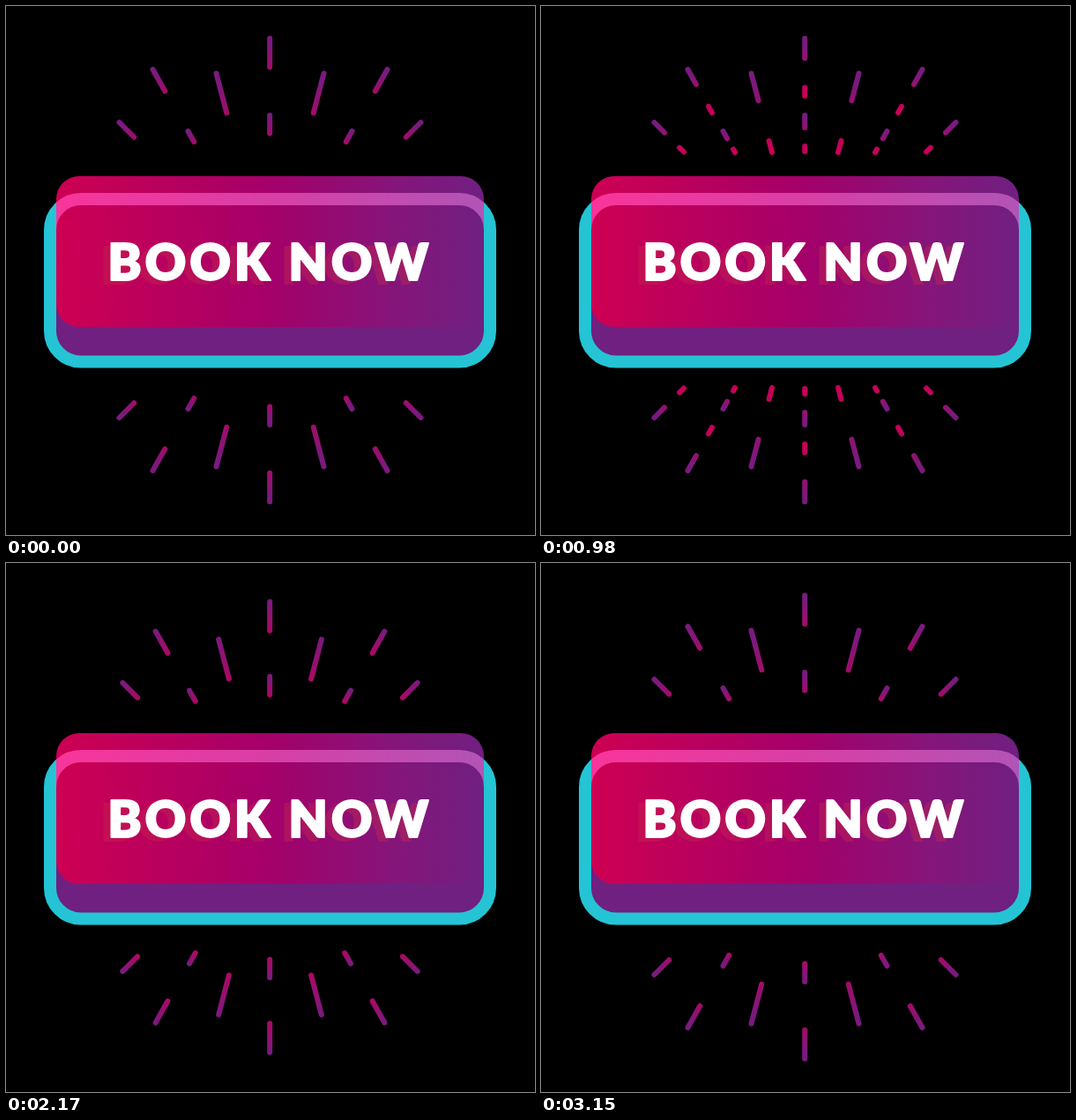
These frames come from a looping animation (600 px wide and 600 px high, 3220 ms). An HTML page:

```html
<!DOCTYPE html>
<html lang="en">
<head>
<meta charset="utf-8">
<title>Book now</title>
<style>
  html, body { margin: 0; width: 100%; height: 100%; overflow: hidden; background: #000; }
  svg { display: block; width: 100%; height: 100%; }
  text { font: 900 57px Lato, sans-serif; letter-spacing: 4.2px; stroke-width: 2; stroke-linejoin: round; }
  .ray { fill: none; stroke-width: 6; stroke-linecap: round; stroke-dasharray: 1 1.02; }
  #label { fill: #fff; stroke: #fff; }
  #shade { fill: #c42a4c; stroke: #c42a4c; }
</style>
</head>
<body>
<svg viewBox="0 0 600 600">
  <defs>
    <linearGradient id="face">
      <stop offset="0" stop-color="#cd0052"/>
      <stop offset=".5" stop-color="#a4006a"/>
      <stop offset=".8" stop-color="#84167a"/>
      <stop offset="1" stop-color="#701f82"/>
    </linearGradient>
    <linearGradient id="shine">
      <stop offset="0" stop-color="#f9359a"/>
      <stop offset=".5" stop-color="#d83fa6"/>
      <stop offset="1" stop-color="#b055b6"/>
    </linearGradient>
    <clipPath id="top"><rect x="57" y="193" width="485" height="171" rx="26"/></clipPath>
    <rect id="frame" x="50" y="219" width="499" height="184.5" rx="35" stroke-width="14"/>
    <g id="words"><text x="115.5" y="310.5">BOOK</text><text x="320.5" y="310.5">NOW</text></g>
  </defs>
  <g id="rays"></g>
  <use href="#frame" fill="#6f2080" stroke="#24c4d5"/>
  <rect x="57" y="193" width="485" height="171" rx="26" fill="url(#face)"/>
  <g clip-path="url(#top)"><use href="#frame" fill="none" stroke="url(#shine)"/></g>
  <use id="shade" href="#words" x="-8" y="4.5"/>
  <use id="label" href="#words"/>
</svg>
<script>
const $ = id => document.getElementById(id);
const STEP = 70, LOOP = 3220, RAY_MS = 525, BLINK_MS = 787.5;

// Each ray runs from its outer end to its inner end; the rest are mirror images.
const RAYS = [
  [299.2, 36.7, 299.2, 102], [299.2, 124, 299.2, 165], [238.5, 76.5, 262, 166],
  [166.5, 72, 194, 121], [206.5, 142, 220, 166], [128.5, 132, 162, 165.5]
];

const add = (parent, name, attrs) => {
  const el = document.createElementNS('http://www.w3.org/2000/svg', name);
  for (const key in attrs) el.setAttribute(key, attrs[key]);
  return parent.appendChild(el);
};

const lines = [];
RAYS.forEach(([ax, ay, bx, by], i) => {
  for (const flipX of ax > 299 ? [0] : [0, 1]) for (const flipY of [0, 1]) {
    const mx = x => flipX ? 599 - x : x, my = y => flipY ? 599 - y : y;
    const ends = { x1: mx(ax), y1: my(ay), x2: mx(bx), y2: my(by) };
    const id = `g${i}${flipX}${flipY}`;
    const grad = add($('rays'), 'linearGradient', { id, gradientUnits: 'userSpaceOnUse', ...ends });
    add(grad, 'stop', { offset: .1, 'stop-color': '#7a1a7e' });
    add(grad, 'stop', { offset: .9, 'stop-color': '#c50057' });
    lines.push(add($('rays'), 'path', {
      class: 'ray', pathLength: 2, stroke: `url(#${id})`,
      d: `M${ends.x1} ${ends.y1}L${ends.x2} ${ends.y2}`
    }));
  }
});

const clamp = v => Math.max(0, Math.min(1, v));

function draw(now) {
  const t = Math.floor(now % LOOP / STEP) * STEP;
  const p = t % RAY_MS / RAY_MS;
  const travel = p * (.82 + .18 * p);
  for (const line of lines) line.style.strokeDashoffset = -2.02 * travel;

  const b = t % BLINK_MS;
  const lit = b < 350 ? clamp((237 - b) / 44) : clamp((b - 455) / 78);
  $('label').style.opacity = lit;
  $('shade').style.opacity = .8 - .4 * lit;
}

const start = performance.now();
function tick() {
  draw(performance.now() - start);
  requestAnimationFrame(tick);
}
tick();
</script>
</body>
</html>
```
